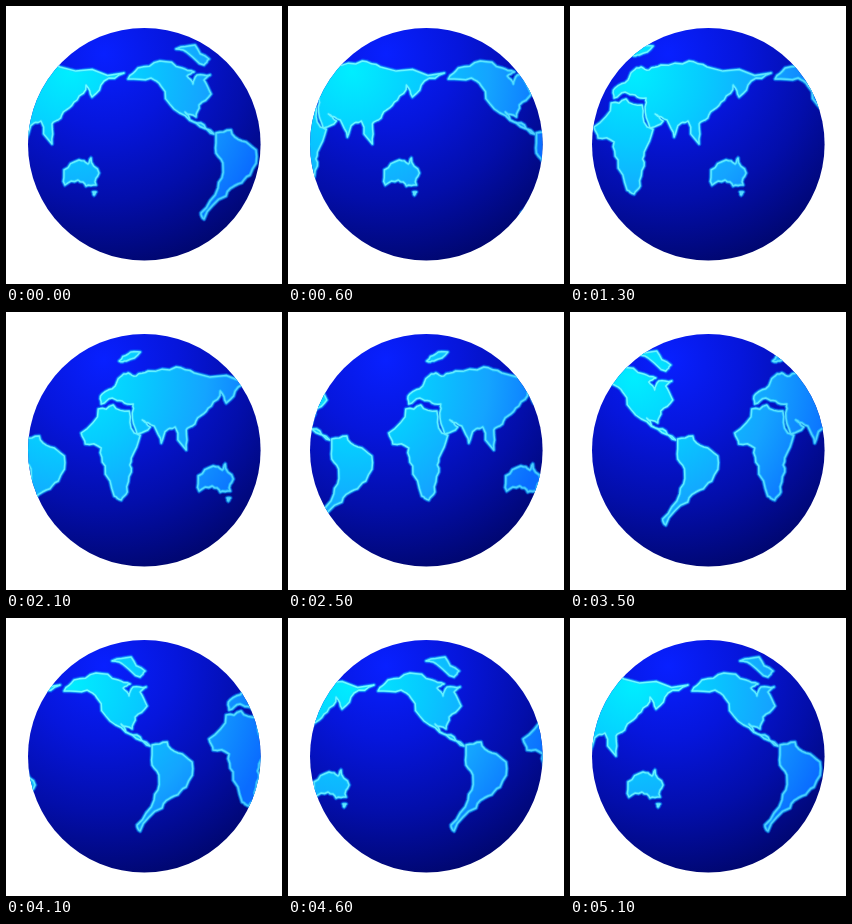
These frames come from a looping animation (276x278 px, 5200 ms). An HTML page with a canvas:

```html
<!DOCTYPE html>
<html lang="en">
<head>
<meta charset="utf-8">
<title>Turning globe</title>
<style>
  html, body { margin: 0; width: 100%; height: 100%; overflow: hidden; background: #fff; }
  canvas { display: block; }
</style>
</head>
<body>
<canvas id="globe" width="276" height="278"></canvas>
<script>
const W = 276, H = 278;
const ctx = document.getElementById('globe').getContext('2d');
const LOOP = 5200, STEP = 100, TURN = 51;
const MAP_WIDTH = 326;
const CENTER = 138.3, R = 116.3;

// Key points of each coast on a flat map; rough() fills in the ragged shore.
const coasts = {
  eurasia: `-39,92 -38,82 -25,74 -20,65 -12,61 -4,64 8,59 36,55 54,61 118,67 98,75 86,91
    80,79 71,94 60,104 52,114 46,118 46,138 35,115 28,117 21,131 14,114 2,108 10,115
    -3,122 -8,101 -7,92 -18,89 -28,86`,
  africa: `-42,97 -27,93 -11,99 -6,121 0,123 -9,146 -9,160 -13,180 -19,188 -26,184
    -35,154 -39,136 -55,132 -59,121`,
  northAmerica: `122,73 132,62 154,55 176,62 188,66 181,70 187,78 191,69 204,69 198,74
    205,88 193,99 190,111 179,106 184,114 198,119 208,128 190,117 168,103 155,80 145,72`,
  southAmerica: `210,127 225,124 236,135 250,144 244,169 232,178 220,190 198,213 195,207
    212,182 217,161 210,147`,
  australia: `58,164 73,154 82,158 85,152 93,167 90,179 80,180 72,174 59,179`,
  tasmania: `87,186 90,186 88,189`,
  greenland: `170,43 189,39 203,53 198,59 183,48`,
  arctic: `-21,49 -12,42 0,40 -14,49`
};

let seed = 11;
function random() {
  seed = seed * 16807 % 2147483647;
  return seed / 2147483647;
}

// Pushes the middle of every side a little in or out.
function rough(points) {
  return points.flatMap(([x, y], i) => {
    const [nx, ny] = points[(i + 1) % points.length];
    const push = (random() - .5) * .3;
    return [[x, y], [(x + nx) / 2 + (y - ny) * push, (y + ny) / 2 + (nx - x) * push]];
  });
}

const land = new Path2D();
for (const coast of Object.values(coasts)) {
  const points = coast.split(/\s+/).map(p => p.split(',').map(Number));
  land.addPath(new Path2D(`M${rough(rough(points)).join(' ')}Z`));
}

function radial(x, y, r, ...colors) {
  const g = ctx.createRadialGradient(x, y, 0, x, y, r);
  colors.forEach((color, i) => g.addColorStop(i / (colors.length - 1), color));
  return g;
}

const ocean = radial(98, 48, 220, '#0820ff', '#0616dc', '#030eaa', '#00066c');
const ground = radial(64, 66, 205, '#00eeff', '#06ccff', '#14a4ff', '#0a6cff');
const edge = radial(80, 80, 210, '#70ffff', '#60e8ff', '#40c0ff');

function outline(path, width, style) {
  ctx.lineWidth = width;
  ctx.strokeStyle = style;
  ctx.stroke(path);
}

function draw(shift) {
  const view = new Path2D();
  for (const x of [shift, shift - MAP_WIDTH]) {
    view.addPath(land, new DOMMatrix().translate(x, 0));
  }
  ctx.clearRect(0, 0, W, H);
  ctx.save();
  ctx.beginPath();
  ctx.arc(CENTER, CENTER, R, 0, Math.PI * 2);
  ctx.clip();
  ctx.fillStyle = ocean;
  ctx.fillRect(0, 0, W, H);
  ctx.lineJoin = 'round';
  outline(view, 5, 'rgba(0,120,255,.4)');
  ctx.fillStyle = ground;
  ctx.fill(view);
  outline(view, 3.2, 'rgba(40,215,255,.55)');
  outline(view, 1.5, edge);
  ctx.restore();
}

function frame() {
  const step = Math.floor(performance.now() % LOOP / STEP);
  draw(step % TURN * MAP_WIDTH / TURN);
  requestAnimationFrame(frame);
}
frame();
</script>
</body>
</html>
```
